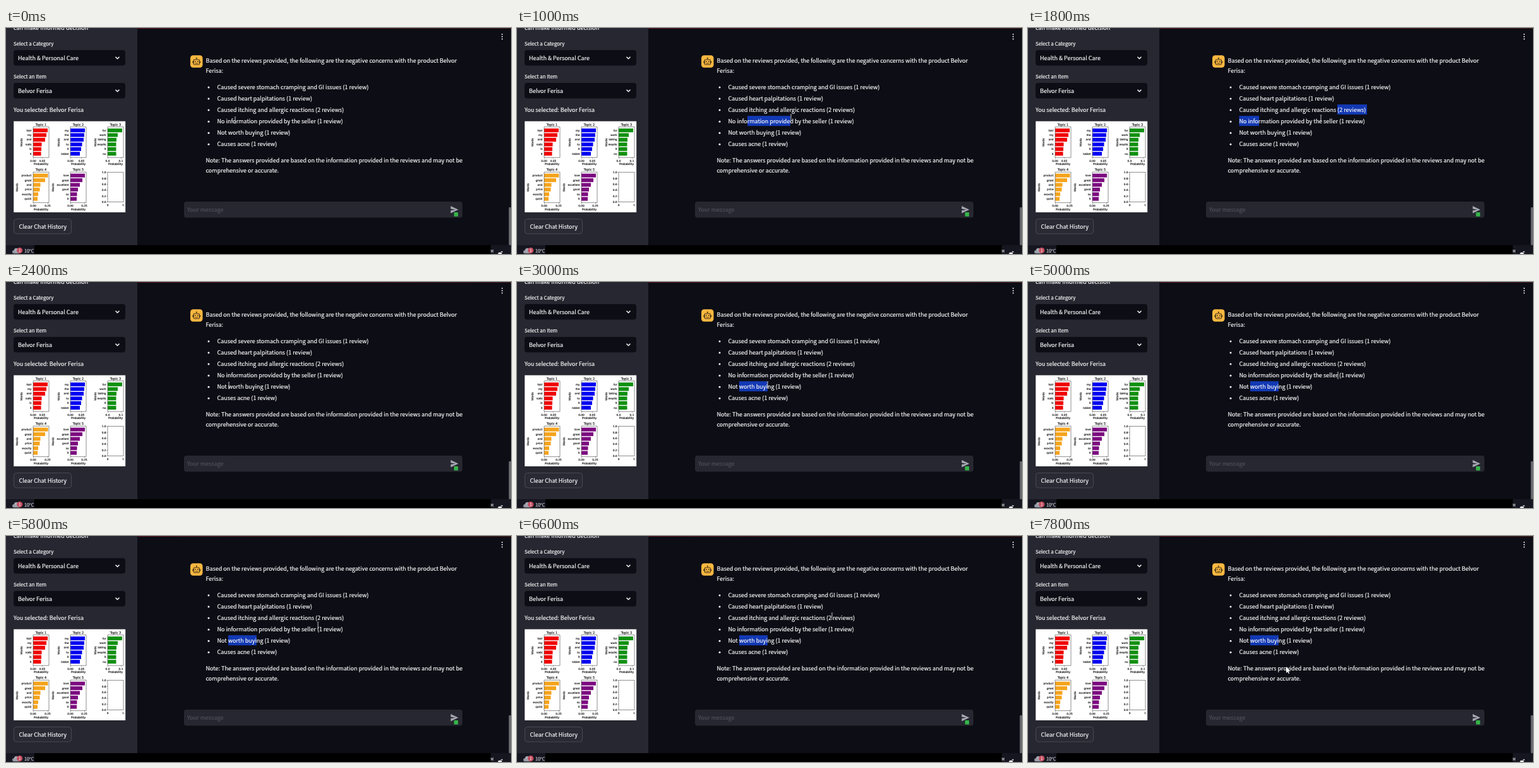
An HTML page with a canvas for the animation above (8000 ms loop, 800 by 358 pixels).

```html
<!DOCTYPE html>
<html lang="en">
<head>
<meta charset="utf-8">
<title>Review assistant</title>
<style>
  html, body { margin: 0; width: 100%; height: 100%; overflow: hidden; background: #0d0d15; }
  canvas { display: block; width: 100vw; height: 100vh; }
</style>
</head>
<body>
<canvas id="stage" width="800" height="358"></canvas>
<script>
const ctx = document.getElementById('stage').getContext('2d');
const LOOP = 8000, STEP = 200;
const UI = '"Noto Sans CJK JP", "Noto Sans CJK SC", "Noto Sans CJK KR", "Noto Sans CJK", sans-serif';
const PLOT = '"DejaVu Sans", sans-serif';
const BODY = 9, SMALL = 7.87;
const INK = '#f4f4f6', PANEL = '#262730', PAGE = '#0d0d15', BLUE = '#1239b4';
const PRODUCT = 'Belvor Ferisa';
const [BRAND, ITEM] = PRODUCT.split(' ');

function rect(x, y, w, h, color) {
  ctx.fillStyle = color;
  ctx.fillRect(x, y, w, h);
}

function rounded(x, y, w, h, r, fill, line, width = 1) {
  ctx.beginPath();
  ctx.roundRect(x, y, w, h, r);
  ctx.fillStyle = fill;
  ctx.fill();
  if (line) {
    ctx.strokeStyle = line;
    ctx.lineWidth = width;
    ctx.stroke();
  }
}

function disc(x, y, r, color) {
  ctx.beginPath();
  ctx.arc(x, y, r, 0, Math.PI * 2);
  ctx.fillStyle = color;
  ctx.fill();
}

function shape(points, fill) {
  ctx.beginPath();
  points.forEach(([x, y]) => ctx.lineTo(x, y));
  ctx.closePath();
  ctx.fillStyle = fill;
  ctx.fill();
}

// A hairline outline gives the text a slightly heavier weight.
function text(str, x, y, size = BODY, color = INK, align = 'left', family = UI) {
  ctx.font = `${size}px ${family}`;
  ctx.textAlign = align;
  ctx.fillStyle = ctx.strokeStyle = color;
  ctx.lineWidth = 0.22;
  ctx.lineJoin = 'round';
  ctx.fillText(str, x, y);
  ctx.strokeText(str, x, y);
}

function plotText(str, x, y, size, align = 'center') {
  text(str, x, y, size, '#2a2a2a', align, PLOT);
}

function frameBox(x, y, w, h) {
  ctx.strokeStyle = '#444';
  ctx.lineWidth = 0.6;
  ctx.strokeRect(x, y, w, h);
}

// ---- sidebar ----
function select(label, value, y) {
  text(label, 12, y - 7.5, SMALL);
  rounded(12, y, 177, 24.5, 4, PAGE);
  text(value, 19, y + 15.7);
  ctx.beginPath();
  ctx.moveTo(173.5, y + 10.8);
  ctx.lineTo(176.5, y + 13.8);
  ctx.lineTo(179.5, y + 10.8);
  ctx.strokeStyle = INK;
  ctx.lineWidth = 1.5;
  ctx.stroke();
}

const topics = [
  { x: 43, y: 156.7, color: '#f00000', side: 24, ticks: ['0.00', '0.05'], gap: 14.5,
    words: 'hair my and nails is it', bars: [23, 21, 19, 13.5, 13, 12.5] },
  { x: 102, y: 156.7, color: '#0000f0', side: 83, ticks: ['0.00', '0.05'], gap: 17.5,
    words: 'my the and to it tablet', bars: [23, 22, 21, 18.5, 17, 15] },
  { x: 161, y: 156.7, color: '#109010', side: 141, ticks: ['0.0', '0.1'], gap: 21,
    words: 'for work taking results it no', bars: [23, 16, 14, 13.5, 13.5, 13.5] },
  { x: 43, y: 228.2, color: '#f5a41c', side: 17, ticks: ['0.00', '0.25'], gap: 23,
    words: 'product great and price exactly quick', bars: [23.5, 19, 11.5, 10.5, 8, 7] },
  { x: 102, y: 228.2, color: '#7c0a80', side: 74, ticks: ['0.00', '0.25'], gap: 22,
    words: 'love great excellent good so it', bars: [23, 19, 15, 12, 10.5, 10] }
];

function drawTopic(topic, i) {
  const { x, y } = topic;
  plotText('Topic ' + (i + 1), x + 12.5, y - 2.2, 5);
  topic.words.split(' ').forEach((word, row) => {
    const mid = y + 5.5 + row * 7.4;
    rect(x, mid - 3, topic.bars[row], 6, topic.color);
    plotText(word, x - 2.5, mid + 1.4, 4.2, 'right');
  });
  frameBox(x, y, 25, 48.5);
  topic.ticks.forEach((tick, n) => {
    rect(x + n * topic.gap, y + 48.5, 0.6, 1.5, '#444');
    plotText(tick, x + n * topic.gap, y + 55, 4.3);
  });
  plotText('Probability', x + 12.5, y + 60.5, 4.4);
  ctx.save();
  ctx.translate(topic.side + 1.5, y + 24.5);
  ctx.rotate(-Math.PI / 2);
  plotText('Words', 0, 0, 4.3);
  ctx.restore();
}

function drawPlots() {
  rect(12.2, 147.7, 177, 144.3, '#fff');
  topics.forEach(drawTopic);
  frameBox(161, 228.5, 25, 47);
  for (let i = 0; i <= 5; i++) {
    const y = 228.5 + i * 9.4;
    rect(159.5, y, 1.5, 0.6, '#444');
    plotText((1 - i / 5).toFixed(1), 158.5, y + 1.6, 4.3, 'right');
  }
  plotText('0', 161, 282, 4.3);
  plotText('1', 185.5, 282, 4.3);
}

function drawSidebar() {
  rect(0, 0, 208, 344, PANEL);
  text('can make informed decision', 12, 2.6);
  select('Select a Category', 'Health & Personal Care', 35);
  select('Select an Item', PRODUCT, 87);
  text('You selected: ' + PRODUCT, 12, 133.3);
  drawPlots();
  rounded(12.5, 302.5, 91, 23.5, 4, '#292a34', '#484952');
  text('Clear Chat History', 20.5, 317.7);
}

// ---- chat ----
const bullets = [
  'Caused severe stomach cramping and GI issues (1 review)',
  'Caused heart palpitations (1 review)',
  'Caused itching and allergic reactions (2 reviews)',
  'No information provided by the seller (1 review)',
  'Not worth buying (1 review)',
  'Causes acne (1 review)'
];
const rowY = i => 97 + i * 18.05;

function drawBot() {
  const dark = '#4a3717', amber = '#fab840';
  rounded(292, 43.3, 19.5, 19.5, 4.5, amber);
  rounded(297.3, 50, 9, 8, 1.2, amber, dark, 1.2);
  rect(301.3, 47.8, 1, 2, dark);
  disc(301.8, 47.8, 1, dark);
  rect(295.4, 52.6, 1.6, 2.8, dark);
  rect(306.6, 52.6, 1.6, 2.8, dark);
  disc(299.9, 53, 0.9, dark);
  disc(303.7, 53, 0.9, dark);
  rect(299.6, 55.5, 4.4, 1, dark);
}

function drawChat(t) {
  rect(208, 0, 592, 344, PAGE);
  const glow = ctx.createLinearGradient(208, 0, 800, 0);
  glow.addColorStop(0, '#5e1a24');
  glow.addColorStop(1, '#4a241d');
  rect(208, 0, 592, 1, glow);
  [10, 13.7, 17.4].forEach(y => disc(786, y, 1, INK));

  drawBot();
  text('Based on the reviews provided, the following are the negative concerns with the product ' + BRAND, 316.5, 54.6);
  text(ITEM + ':', 316.5, 70.7);
  selection(t).forEach(([row, from, to]) => rect(from, rowY(row) - 12, to - from, 16, BLUE));
  bullets.forEach((line, i) => {
    disc(321, rowY(i) - 3, 1.5, INK);
    text(line, 334.5, rowY(i));
  });
  text('Note: The answers provided are based on the information provided in the reviews and may not be', 316.5, 213);
  text('comprehensive or accurate.', 316.5, 229);

  rounded(282, 275, 441, 25.5, 4, PANEL);
  text('Your message', 287, 291.2, BODY, '#4e5059');
  shape([[704.5, 282], [716.5, 287.7], [704.5, 293.5], [704.5, 289], [712, 287.7], [704.5, 286.4]], '#a6a8b2');
  rect(709.7, 292, 6.5, 6.5, '#35b548');
  rounded(796.5, 284, 3.5, 60, 1, '#6a6b70');
}

function drawTaskbar() {
  rect(0, 344, 800, 14, '#15161f');
  rect(45, 344, 723, 14, '#000');
  disc(12.5, 354.5, 2.6, '#8f939e');
  disc(16.5, 352.6, 3.8, '#a5a9b3');
  rect(12.5, 354, 9, 3.1, '#9a9ea8');
  disc(21.7, 352.3, 4.6, '#c44d60');
  text('1', 21.7, 354.9, 6.5, '#f0dfe2', 'center');
  text('10°C', 29, 356, 7.2, '#c9cad1');
  ctx.save();
  ctx.beginPath();
  ctx.rect(768, 344, 32, 14);
  ctx.clip();
  text('M', 767.2, 356, 6.5, '#c4c5cb');
  rounded(779.5, 355.5, 6, 4, 1.5, '#f0f0f2');
  rect(784, 353.8, 3, 1.4, '#d8d9de');
  ctx.restore();
}

// ---- pointer ----
const path = [
  [0, 363, 146], [200, 364, 146], [1000, 434, 142], [1400, 486, 135], [1800, 464, 143],
  [2400, 353, 164], [2600, 353, 164], [3000, 397, 163], [3400, 399, 163],
  [4600, 490, 148], [5000, 491, 148], [5600, 493, 145], [6600, 499, 127],
  [7000, 494, 140], [7800, 410, 212]
];

function pointer(t) {
  const n = path.findIndex(key => key[0] > t);
  if (n < 0) return path[path.length - 1].slice(1);
  const [t0, x0, y0] = path[n - 1], [t1, x1, y1] = path[n];
  const u = (t - t0) / (t1 - t0);
  return [x0 + (x1 - x0) * u, y0 + (y1 - y0) * u];
}

// Highlighted spans as [row, left, right].
function selection(t) {
  const x = pointer(t)[0];
  if (t < 200) return [];
  if (t < 1400) return [[3, 365, x - 1]];
  if (t < 2400) return [[2, 490, 537], [3, 334.5, 366]];
  if (t < 2600) return [];
  return [[4, 352, t < 3000 ? x : 397]];
}

function drawPointer(t) {
  const [x, y] = pointer(t);
  if (t >= 7600) {
    const arrow = [[0, -5], [0, 5], [2.3, 3], [3.8, 6.3], [5.2, 5.6], [3.7, 2.5], [6.6, 2.2]];
    shape(arrow.map(([dx, dy]) => [x - 1 + dx, y + dy]), '#f4f4f4');
    return;
  }
  rect(x - 0.5, y - 5, 1, 10, '#c8c9ce');
  rect(x - 1.5, y - 5.5, 3, 0.8, '#8d8e95');
  rect(x - 1.5, y + 4.7, 3, 0.8, '#8d8e95');
}

function draw(now) {
  const t = Math.floor(now % LOOP / STEP) * STEP;
  drawChat(t);
  drawSidebar();
  drawTaskbar();
  drawPointer(t);
  requestAnimationFrame(draw);
}
draw(0);
</script>
</body>
</html>
```
